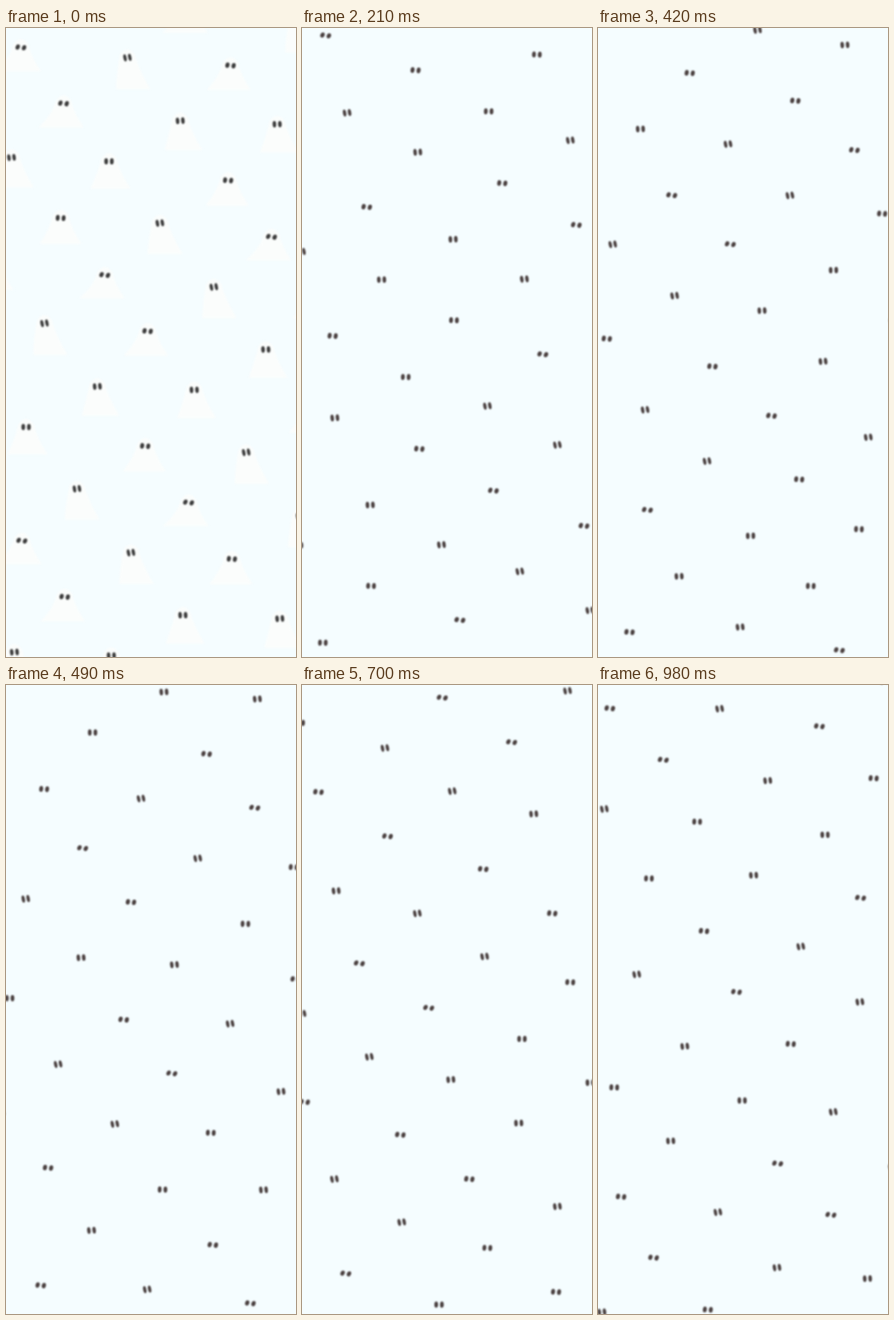
An HTML page with a canvas that plays this animation: 390 by 844 pixels, repeating every 1.05 s.

```html
<!DOCTYPE html>
<html lang="en">
<head>
<meta charset="utf-8">
<title>Drifting ghosts</title>
<style>
  html, body { margin: 0; width: 100%; height: 100%; overflow: hidden; background: #f5fdff; }
  canvas { display: block; width: 390px; height: 844px; }
</style>
</head>
<body>
<canvas id="stage" width="390" height="844"></canvas>
<script>
const W = 390, H = 844;
const STEP = 70, STEPS = 15;
const BODY_STEPS = [0, 9];
const RAD = Math.PI / 180;
const ctx = document.getElementById('stage').getContext('2d');

// Ghosts sit on a lattice; rows alternate between climbing and descending.
function eachGhost(t, draw) {
  for (let row = -4; row <= 10; row++) {
    const m = row / 2, down = row % 2 !== 0;
    for (let n = -5; n <= 14; n++) {
      const u = n + (down ? -t : t);
      const phase = (20 + 158 * (n + m) + (down ? 180 + 562 * t : 158 * t)) * RAD;
      const c = Math.cos(phase), s = Math.sin(phase);
      const x = 66 + 80.5 * u - 31 * m + 8 * c;
      const y = 249.7 - 65.2 * u + 291.3 * m + 5.6 * c;
      if (x > -50 && x < W + 50 && y > -60 && y < H + 30) draw(x, y, s);
    }
  }
}

// s runs from -1 (tall, leaning left) to 1 (flat, leaning right).
function drawBody(x, y, s) {
  const half = 27 + 4 * s, bottom = 37 - 5.5 * s, shift = 2 - 6 * s;
  ctx.beginPath();
  ctx.moveTo(x + shift - half, y + bottom);
  ctx.quadraticCurveTo(x - 14, y + 14, x - 10, y - 4);
  ctx.quadraticCurveTo(x, y - 18, x + 10, y - 4);
  ctx.quadraticCurveTo(x + 14, y + 14, x + shift + half, y + bottom);
  ctx.closePath();
  ctx.fill();
}

function drawEyes(x, y, s) {
  ctx.save();
  ctx.translate(x, y);
  ctx.rotate(7 * s * RAD);
  ctx.scale(1 + 0.14 * s, 1 - 0.16 * s);
  ctx.beginPath();
  for (const side of [-1, 1]) {
    const ex = side * 3.8, tilt = 9 * s * RAD;
    ctx.moveTo(ex + 2.5 * Math.cos(tilt), 2.5 * Math.sin(tilt));
    ctx.ellipse(ex, 0, 2.5, 4.2, tilt, 0, 2 * Math.PI);
  }
  ctx.fill();
  ctx.restore();
}

function render(step) {
  const t = step / STEPS, solid = BODY_STEPS.includes(step);
  ctx.filter = 'none';
  ctx.fillStyle = '#f5fdff';
  ctx.fillRect(0, 0, W, H);
  if (solid) {
    ctx.filter = 'blur(1.5px)';
    ctx.fillStyle = '#fbfdfc';
    eachGhost(t, drawBody);
  }
  ctx.filter = 'blur(0.9px)';
  ctx.fillStyle = solid ? '#3c3c3c' : '#4a4040';
  eachGhost(t, drawEyes);
}

let last = -1;
function tick() {
  const step = Math.floor(performance.now() / STEP) % STEPS;
  if (step !== last) render(last = step);
  requestAnimationFrame(tick);
}
tick();
</script>
</body>
</html>
```
